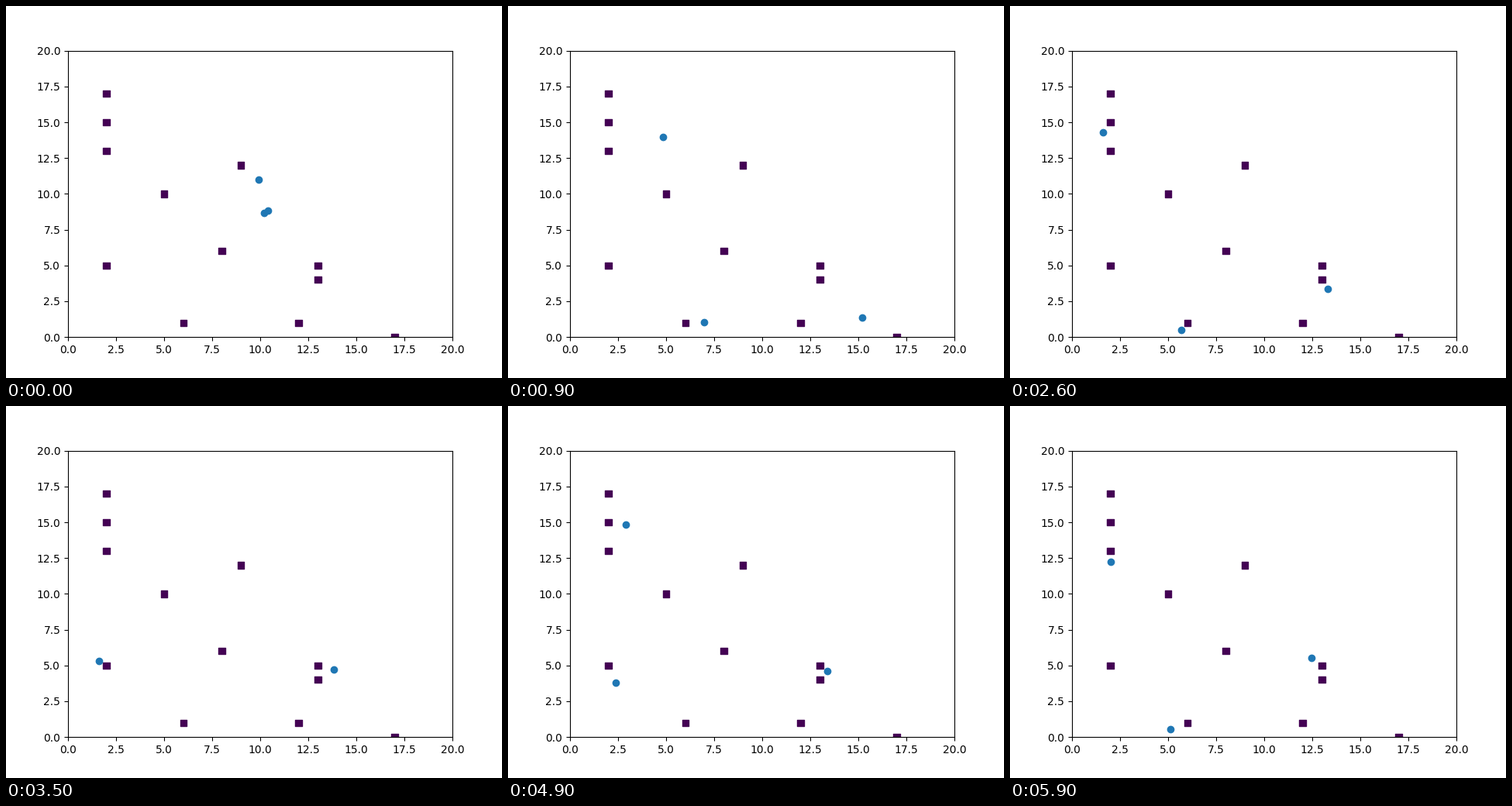
These frames come from a looping animation (640x480 px, 6000 ms). A matplotlib script:

```python
import math

import numpy as np
import matplotlib.pyplot as plt
from matplotlib.animation import FuncAnimation

FRAMES = 60
INTERVAL = 100
WANDER = 0.6

ITEMS = [(2, 17), (2, 15), (2, 13), (9, 12), (5, 10), (8, 6), (2, 5),
         (13, 5), (13, 4), (6, 1), (12, 1), (17, 0)]

# Places the agents keep returning to.
TOP, MIDDLE, BOTTOM = (1.62, 17.3), (1.62, 13.3), (1.62, 5.3)
LEFT, RIGHT = (5.7, 0.5), (11.7, 0.5)
UPPER, LOWER = (13.83, 4.7), (13.83, 3.7)
HOP = [UPPER, (*LOWER, 1)]

# Stops are (x, y) or (x, y, frames of rest).
CLIMBER = [(9.92, 11), (9.55, 8.95), (4.85, 13.97), TOP, (*MIDDLE, 1), TOP,
           (*BOTTOM, 2), (5.25, 10.4, 1), (2.9, 14.83), TOP, (*MIDDLE, 2),
           (2.03, 12.23)]
RUNNER = [(10.2, 8.67, 1), (6.98, 1.03, 2), LEFT, (*RIGHT, 2), LEFT,
          (0.5, 0.4), (2.2, -1.4, 5), (2.2, 0.8, 4), (0.4, 1.3),
          (2.38, 3.8), (*LEFT, 4), (5.13, 0.53)]
HOPPER = [(10.4, 8.83), (15.2, 1.35), (16.33, 0.1), (*UPPER, 1),
          (*LOWER, 1), *HOP * 2, (13.3, 3.37, 2), *HOP * 6, (*UPPER, 1),
          (13.4, 4.6), *HOP * 2, (*UPPER, 1), (12.47, 5.53)]

rng = np.random.default_rng(4)


def walk(stops):
    """Go from stop to stop at about one unit per frame.

    A rest is spent wandering close by and ends back at the stop.
    """
    track = [stops[0][:2]]
    for x, y, *rest in stops:
        x0, y0 = track[-1]
        steps = round(math.dist((x0, y0), (x, y)))
        if (x0, y0) != (x, y):
            steps = max(1, steps)
        for k in range(1, steps + 1):
            t = k / steps
            track.append((x0 + (x - x0) * t, y0 + (y - y0) * t))
        if rest:
            for _ in range(rest[0] - 1):
                dx, dy = rng.uniform(-WANDER, WANDER, 2)
                track.append((x + dx, y + dy))
            track.append((x, y))
        track[-1] = (x, y)
    return track[:FRAMES]


paths = np.stack([walk(s) for s in (CLIMBER, RUNNER, HOPPER)], axis=1)

fig, ax = plt.subplots(figsize=(6.4, 4.8), dpi=100)
ax.set(xlim=(0, 20), ylim=(0, 20))
ax.scatter(*zip(*ITEMS), marker="s", c=np.zeros(len(ITEMS)), cmap="viridis")
agents = ax.scatter(*paths[0].T, color="#1f77b4")


def update(i):
    agents.set_offsets(paths[i])
    return agents,


anim = FuncAnimation(fig, update, frames=FRAMES, interval=INTERVAL,
                     repeat=True, repeat_delay=0)
plt.show()
```
